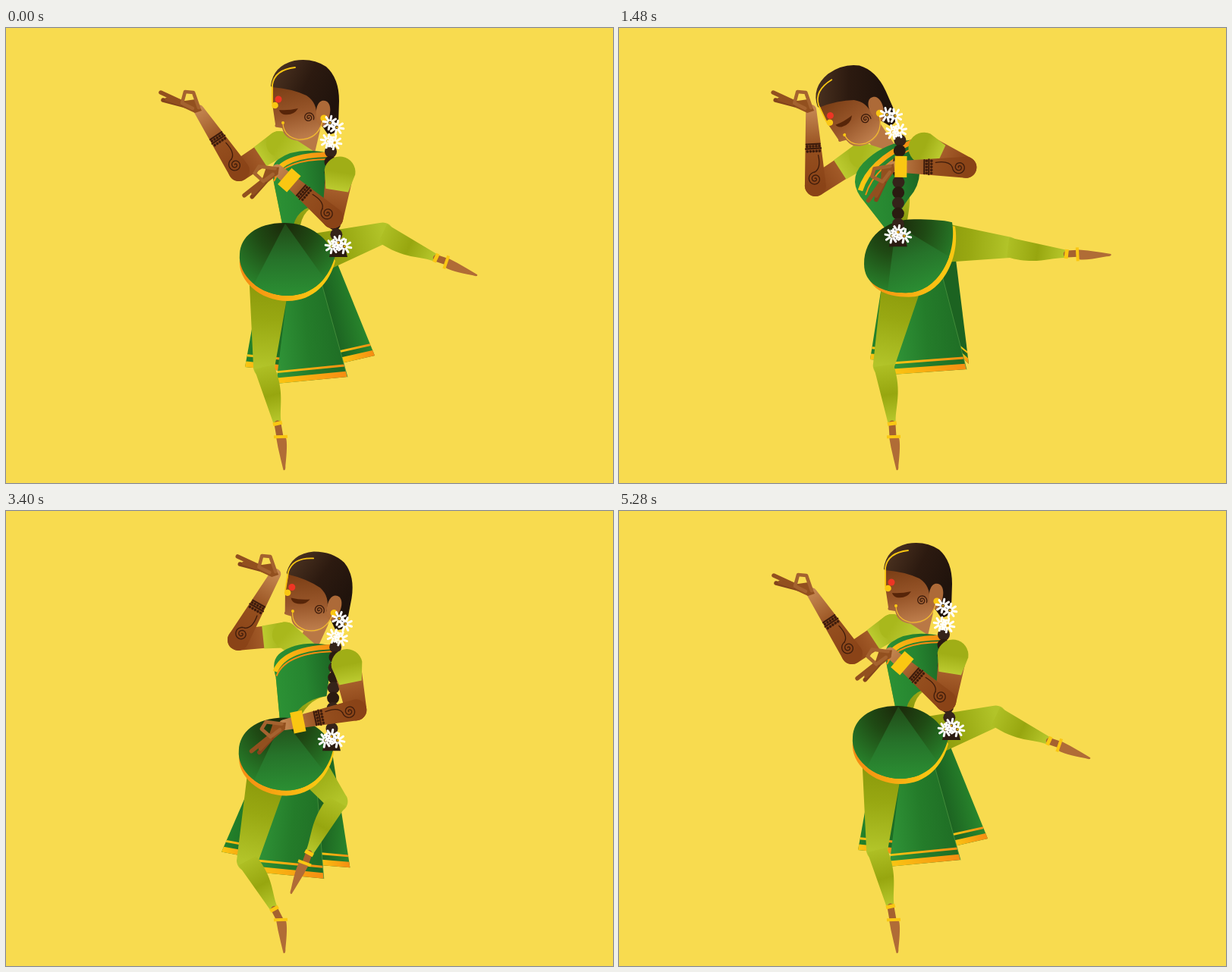
Animation, 800 px wide and 600 px high, one loop 5.32 s. Source, as an HTML page with a canvas:

```html
<!DOCTYPE html>
<html lang="en">
<head>
<meta charset="utf-8">
<title>Dancer</title>
<style>
html, body { margin: 0; width: 100%; height: 100%; overflow: hidden; background: #f8db4f; }
canvas { display: block; }
</style>
</head>
<body>
<canvas id="stage" width="800" height="600"></canvas>
<script>
const ctx = document.getElementById('stage').getContext('2d');
const LOOP = 5320, TAU = Math.PI * 2, RAD = Math.PI / 180;
const GOLD = '#fac712', ORANGE = '#f68c12', SKIN = '#92501f', INK = '#3d1c0c';

// Five poses; each row holds one value set per pose.
const joints = {
  hip: [[371, 308], [383, 303], [383, 343], [383, 354], [368, 320]],
  chest: [[393, 175], [360, 180], [360, 210], [360, 218], [400, 186]],
  turn: [[0], [1], [1], [1], [0]],
  head: [[419, 119, 0], [343, 112, -26], [391, 158, 44], [390, 166, 44], [437, 131, 5]],
  tail: [[438, 286], [368, 272], [347, 302], [371, 312], [434, 299]],
  shoulderL: [[360, 153], [320, 168], [312, 197], [318, 202], [373, 159]],
  elbowL: [[307, 188], [259, 208], [245, 201], [245, 198], [313, 167]],
  wristL: [[254, 108], [253, 108], [284, 108], [291, 109], [362, 80]],
  shoulderR: [[440, 190], [402, 158], [391, 193], [390, 197], [456, 203]],
  armR: [[99, 221], [24, 180], [152, 264], [197, 261], [65, 158]],
  handR: [[-63], [-80], [27], [87], [-81]],
  bangle: [[.78], [.89], [.3], [.24], [.87]],
  hipL: [[348, 322], [376, 322], [380, 359], [383, 369], [343, 335]],
  kneeL: [[340, 447], [349, 445], [307, 466], [301, 470], [320, 460]],
  cuffL: [[358, 522], [360, 522], [352, 526], [352, 527], [354, 525]],
  hipR: [[400, 300], [412, 282], [412, 321], [412, 332], [370, 300]],
  legR: [[-17, 25, 19], [4, 6.6, -3], [-6, -5, -15], [-8.5, -9, -19], [59, 133, 125]]
};
const times = [0, 640, 1440, 2240, 2760, 3560, 4360, 5160, LOOP];
const order = [0, 1, 1, 2, 3, 4, 4, 0, 0];

// Trailing cloth: time, main hem left and right, outer corner, inner corner.
const cloth = [
  [0, 356, 469, 450, 460, 486, 432, 315, 447],
  [720, 380, 457, 474, 441, 546, 358, 331, 437],
  [880, 378, 459, 472, 444, 541, 365, 331, 437],
  [1480, 360, 457, 458, 450, 461, 443, 331, 437],
  [2240, 363, 497, 458, 491, 483, 471, 323, 467],
  [2760, 365, 508, 460, 501, 478, 483, 327, 483],
  [3600, 316, 470, 412, 482, 450, 466, 277, 444],
  [4080, 329, 476, 424, 482, 462, 460, 291, 451],
  [4440, 330, 476, 425, 481, 464, 458, 293, 451]
];
cloth.push([5200, ...cloth[0].slice(1)], [LOOP, ...cloth[0].slice(1)]);

// Monotone cubic interpolation through key rows.
function track(ts, rows) {
  const last = ts.length - 1;
  const secant = (i, k) => (rows[i + 1][k] - rows[i][k]) / (ts[i + 1] - ts[i]);
  const slope = (i, k) => {
    if (i === 0 || i === last) return 0;
    const a = secant(i - 1, k), b = secant(i, k);
    return a * b <= 0 ? 0 : 2 * a * b / (a + b);
  };
  return t => {
    let i = 0;
    while (i < last - 1 && t >= ts[i + 1]) i++;
    const d = ts[i + 1] - ts[i], u = (t - ts[i]) / d, v = u * u * (3 - 2 * u);
    return rows[i].map((a, k) => a + (rows[i + 1][k] - a) * v
      + d * u * (1 - u) * ((1 - u) * slope(i, k) - u * slope(i + 1, k)));
  };
}
const tracks = Object.entries(joints).map(([name, rows]) =>
  [name, track(times, order.map(i => rows[i]))]);
const clothAt = track(cloth.map(r => r[0]), cloth.map(r => r.slice(1)));

const mix = (a, b, u) => a.map((v, i) => v + (b[i] - v) * u);
const add = (p, x, y) => [p[0] + x, p[1] + y];
const polar = (p, deg, r) => add(p, r * Math.cos(deg * RAD), r * Math.sin(deg * RAD));
const angle = (a, b) => Math.atan2(b[1] - a[1], b[0] - a[0]);
const dist = (a, b) => Math.hypot(b[0] - a[0], b[1] - a[1]);

function grad(a, b, ...colors) {
  const g = ctx.createLinearGradient(...a, ...b);
  colors.forEach((c, i) => g.addColorStop(i / (colors.length - 1), c));
  return g;
}
function fill(path, color) { ctx.fillStyle = color; ctx.fill(new Path2D(path)); }
function stroke(path, color, width) {
  ctx.strokeStyle = color; ctx.lineWidth = width;
  ctx.stroke(new Path2D(path));
}
function poly(points, color) { fill('M' + points.join('L') + 'Z', color); }
function dot(x, y, r, color) {
  ctx.fillStyle = color;
  ctx.beginPath(); ctx.arc(x, y, r, 0, TAU); ctx.fill();
}
function at(p, rot, draw, flip = 1) {
  ctx.save();
  ctx.translate(...p); ctx.rotate(rot); ctx.scale(1, flip);
  draw();
  ctx.restore();
}
function limb(a, b, ra, rb, color, flat) {
  const n = angle(a, b), q = Math.PI / 2;
  ctx.fillStyle = color;
  ctx.beginPath();
  ctx.arc(...a, ra, n + q, n + 3 * q);
  if (flat) ctx.lineTo(b[0] + rb * Math.sin(n), b[1] - rb * Math.cos(n)),
    ctx.lineTo(b[0] - rb * Math.sin(n), b[1] + rb * Math.cos(n));
  else ctx.arc(...b, rb, n - q, n + q);
  ctx.fill();
}
function spiral(x, y, r, start, color) {
  let d = '';
  for (let a = 0; a <= 13; a += .3) {
    const q = r * (1 - a / 14);
    d += (d ? 'L' : 'M') + [x + q * Math.cos(start - a), y + q * Math.sin(start - a)];
  }
  stroke(d, color, 1.3);
}
function flower(x, y) {
  for (let i = 0; i < 8; i++) at([x, y], i * TAU / 8 + .2, () => stroke('M3.5 0H9', '#fff', 3));
  dot(x, y, 1.6, '#d8a21a');
}

function hand(wrist, deg) {
  at(wrist, deg * RAD, () => {
    stroke('M-2-1L-24-7L-47-13', '#83441c', 5.5);
    stroke('M-2-3L-24-11L-50-23', SKIN, 5.5);
    stroke('M-24-8L-42-14', SKIN, 5);
    fill('M4 1L-4-14L-25-11L-20-3L-5 4Z', SKIN);
    stroke('M0-3L-7-23L-18-24L-22-9L-8-2', '#a4622f', 4.6);
  });
}
function forearm(elbow, wrist) {
  limb(elbow, wrist, 14, 7, grad(elbow, wrist, '#8a4317', '#96501f', '#c48650'));
  at(elbow, angle(elbow, wrist), () => {
    stroke('M49-10V10M55-9V9', INK, 2.2);
    for (let y = -8; y <= 8; y += 4) dot(45.5, y, 1.8, INK), dot(52, y, 1.8, INK);
    spiral(9, 0, 9, 0, INK);
    stroke('M18 0Q22 9 40 6', INK, 1.3);
  });
}
function upperArm(shoulder, elbow, r, sleeve) {
  limb(shoulder, elbow, r - 2, 14, grad(shoulder, elbow, '#b87038', '#8a4317'));
  const end = mix(shoulder, elbow, sleeve);
  limb(shoulder, end, r, 15, grad(shoulder, end, '#a0ae16', '#bccb30'), true);
}

function leg(hip, knee, cuff, ankle, footDeg, flip) {
  const n = dist(knee, cuff);
  limb(hip, knee, 28, 14, grad(hip, knee, '#879409', '#98a812', '#b2c429'));
  at(knee, angle(knee, cuff), () => {
    fill(`M0-13L${n}-5V5C${n * .75} 6 ${n * .5} 20 0 13Z`, grad([0, 0], [n, 0], '#aebf24', '#97a60f', '#b9ca2e'));
  }, flip);
  stroke('M' + cuff + 'L' + ankle, '#a5622f', 9);
  at(cuff, angle(knee, cuff), () => fill('M-3-6H2V6H-3Z', GOLD));
  at(ankle, footDeg * RAD, () => {
    fill('M0-5L14-3Q30 0 44 3Q46 6 38 6Q10 10 2 8Q-2 4 0-5Z', '#b06c36');
    fill('M-2-8H2V10H-2Z', GOLD);
  }, flip);
}

function panel(tl, tr, br, bl, ...colors) {
  const from = (top, low, d) => mix(low, top, d / dist(low, top));
  const band = (lo, hi) => poly([from(tl, bl, lo), from(tr, br, lo), from(tr, br, hi), from(tl, bl, hi)],
    grad(bl, br, GOLD, ORANGE));
  poly([tl, tr, br, bl], grad(bl, br, ...colors));
  band(0, 7.5);
  band(14, 17);
}
function skirt(hip, c) {
  const bl = c.slice(0, 2), br = c.slice(2, 4), outer = c.slice(4, 6), inner = c.slice(6);
  panel(add(hip, -31, 0), add(hip, 10, 0), add(bl, 8, -17), inner, '#23832b', '#1c6a23');
  panel(add(hip, 32, 0), add(hip, 59, -14), outer, add(br, -8, -18), '#1c6321', '#2a8a2e');
  panel(add(hip, 5, 0), add(hip, 37, 0), br, bl, '#319639', '#247c2a', '#1f6d25');
  stroke('M' + add(hip, 37, 0) + 'L' + br, '#4f9a43', .7);
}

const potFront = [-63, -10, -62, -32, -42, -51, -4, -51, 25, -51, 50, -36, 63, -8,
  56, 20, 35, 45, 0, 45, -36, 45, -66, 18, -63, -10];
const potSide = [-60, 8, -60, -28, -30, -52, 8, -51, 25, -51, 45, -50, 56, -47,
  63, -5, 38, 46, -5, 46, -37, 46, -60, 34, -60, 8];
function pot(hip, w) {
  const s = mix(potFront, potSide, w);
  const d = 'M' + s.slice(0, 2) + 'C' + s.slice(2) + 'Z';
  const [ax, ay, lx, ly, rx, ry] = mix([-3, -50, -48, 37, 44, 16], [-18, -44, -31, 60, 60, 3], w);
  at(add(hip, ...mix([0, 7], [4, 5.5], w)), 0, () => fill(d, grad([-60, 0], [40, 0], ORANGE, GOLD)));
  at(hip, 0, () => {
    const g = ctx.createRadialGradient(ax, ay, 8, ax, ay, 98);
    g.addColorStop(0, '#1c2f0c'); g.addColorStop(.35, '#1f4a14'); g.addColorStop(1, '#2a8c30');
    fill(d, g);
    ctx.clip(new Path2D(d));
    poly([[ax, ay], [lx, ly], [0, 90], [80, 60], [rx, ry]],
      grad([ax, ay], [(lx + rx) / 2, 45], '#214a17', '#26732a', '#2b8f33'));
  });
}

const bodiceFront = [-34, -2, -8, -20, 36, -9, 30, 22, 27, 56, -14, 61, -40, 29, -46, 6];
const bodiceSide = [-32, -8, -10, -28, 26, -33, 48, 15, 23, 43, 14, 55, -42, 42, -60, 15];
function torso(p) {
  const w = p.turn[0], s = mix(bodiceFront, bodiceSide, w);
  const q = i => add(p.chest, s[i * 2], s[i * 2 + 1]);
  const low = x => add(p.hip, x, -40);
  limb(p.shoulderL, add(p.chest, 4, 0), 17, 15, grad(p.shoulderL, p.chest, '#a9b81c', '#c2d03a'));
  const bend = add(q(5), 10, -1);
  fill(`M${q(4)}Q${bend} ${low(16 - 21 * w)}L${low(-5 - 28 * w)}L${q(6)}Z`,
    grad(q(4), low(0), '#a9b81c', '#7f8e0a'));
  fill(`M${q(0)}Q${q(1)} ${q(2)}Q${q(3)} ${q(4)}Q${q(5)} ${low(7 - 32 * w)}L${low(-5 - 28 * w)}L${q(6)}Q${q(7)} ${q(0)}Z`,
    grad(add(p.chest, -45, 20), add(p.chest, 40, 10), '#2c9235', '#268530', '#1b6122'));
  const b = mix([-41, 21, -28, -10, 40, -8], [-42, 34, -30, -5, 26, -30], w);
  at(p.chest, 0, () => {
    ctx.lineCap = 'butt';
    const d = `M${b.slice(0, 2)}Q${b.slice(2)}`;
    stroke(d, grad([-40, 20], [30, -20], GOLD, ORANGE), 6.5);
    ctx.translate(6 * w + 1, 6);
    stroke(d, ORANGE, 2);
    ctx.lineCap = 'round';
  });
}

function head([x, y, deg]) {
  at([x, y], deg * RAD, () => {
    ctx.translate(-419, -119);
    fill('M352 74L351 100L355 127Q353 131 358 131L364 132L366 138Q371 148 388 149Q408 149 416 128L416 70Z',
      grad([375, 75], [392, 150], '#7c3f16', '#98562a', '#c28250'));
    fill('M349 76Q352 50 380 43Q404 39 422 51Q439 66 439 96L438 128Q436 141 424 140L409 118Q411 99 396 89Q377 80 350 78Z',
      grad([355, 55], [435, 95], '#4b3220', '#2c1a10', '#20130c'));
    fill('M409 119C407 98 416 93 423 97C431 103 427 122 418 130Q410 128 409 119Z', '#ad6a38');
    stroke('M351 99V75Q354 55 381 52', GOLD, 1.8);
    dot(359, 94, 4.5, '#ee3524');
    dot(354.5, 102, 4.3, GOLD);
    fill('M360 108Q372 109 385 106Q379 116 366 114Q361 112 360 108Z', '#572509');
    spiral(399, 118, 7, .4, INK);
    stroke('M365 126Q366 143 385 147Q410 148 417 124', '#f4bd2c', 1.2);
    dot(365, 125, 2, GOLD);
    dot(419, 119, 4.6, GOLD);
    [[8, 6], [17, 12], [5, 30], [14, 32]].forEach(([dx, dy]) => flower(419 + dx, 119 + dy));
  });
}
function headPoint([x, y, deg], px, py) {
  const c = Math.cos(deg * RAD), s = Math.sin(deg * RAD);
  return [x + px * c - py * s, y + px * s + py * c];
}
function braid(root, tail) {
  const bend = [root[0] - 3, (root[1] + tail[1]) / 2], n = 9;
  for (let i = 0; i <= n; i++) {
    const u = i / n, p = mix(mix(root, bend, u), mix(bend, tail, u), u);
    dot(...p, 8, i % 2 ? '#2b1b11' : '#35231a');
  }
  at(tail, 0, () => {
    fill('M-8 0H8L12 16H-12Z', '#2b1b11');
    flower(-8, 2); flower(8, 2); flower(0, -3);
  });
}

function draw(t) {
  const p = Object.fromEntries(tracks.map(([name, f]) => [name, f(t)]));
  ctx.fillStyle = '#f8db4f';
  ctx.fillRect(0, 0, 800, 600);

  upperArm(p.shoulderL, p.elbowL, 17, .47);
  forearm(p.elbowL, p.wristL);
  hand(p.wristL, 0);

  skirt(p.hip, clothAt(t));
  leg(p.hipL, p.kneeL, p.cuffL, [361, 539], 88, -1);
  const [thigh, shin, foot] = p.legR;
  const kneeR = polar(p.hipR, thigh, 101), cuffR = polar(kneeR, shin, 78);
  leg(p.hipR, kneeR, cuffR, polar(cuffR, foot, 14), foot, 1);

  limb(headPoint(p.head, -18, 14), add(p.chest, 0, -8), 13, 13, '#b97845');
  torso(p);
  pot(p.hip, p.turn[0]);
  braid(headPoint(p.head, 9, 44), p.tail);
  head(p.head);

  const elbow = polar(p.shoulderR, p.armR[0], 61), wrist = polar(elbow, p.armR[1], 97);
  upperArm(p.shoulderR, elbow, 20.5, .4);
  forearm(elbow, wrist);
  hand(wrist, p.handR[0]);
  at(mix(elbow, wrist, p.bangle[0]), p.armR[1] * RAD, () => fill('M-8-14H8V14H-8Z', GOLD));
}

ctx.lineCap = ctx.lineJoin = 'round';
(function frame() {
  draw(performance.now() % LOOP);
  requestAnimationFrame(frame);
})();
</script>
</body>
</html>
```
